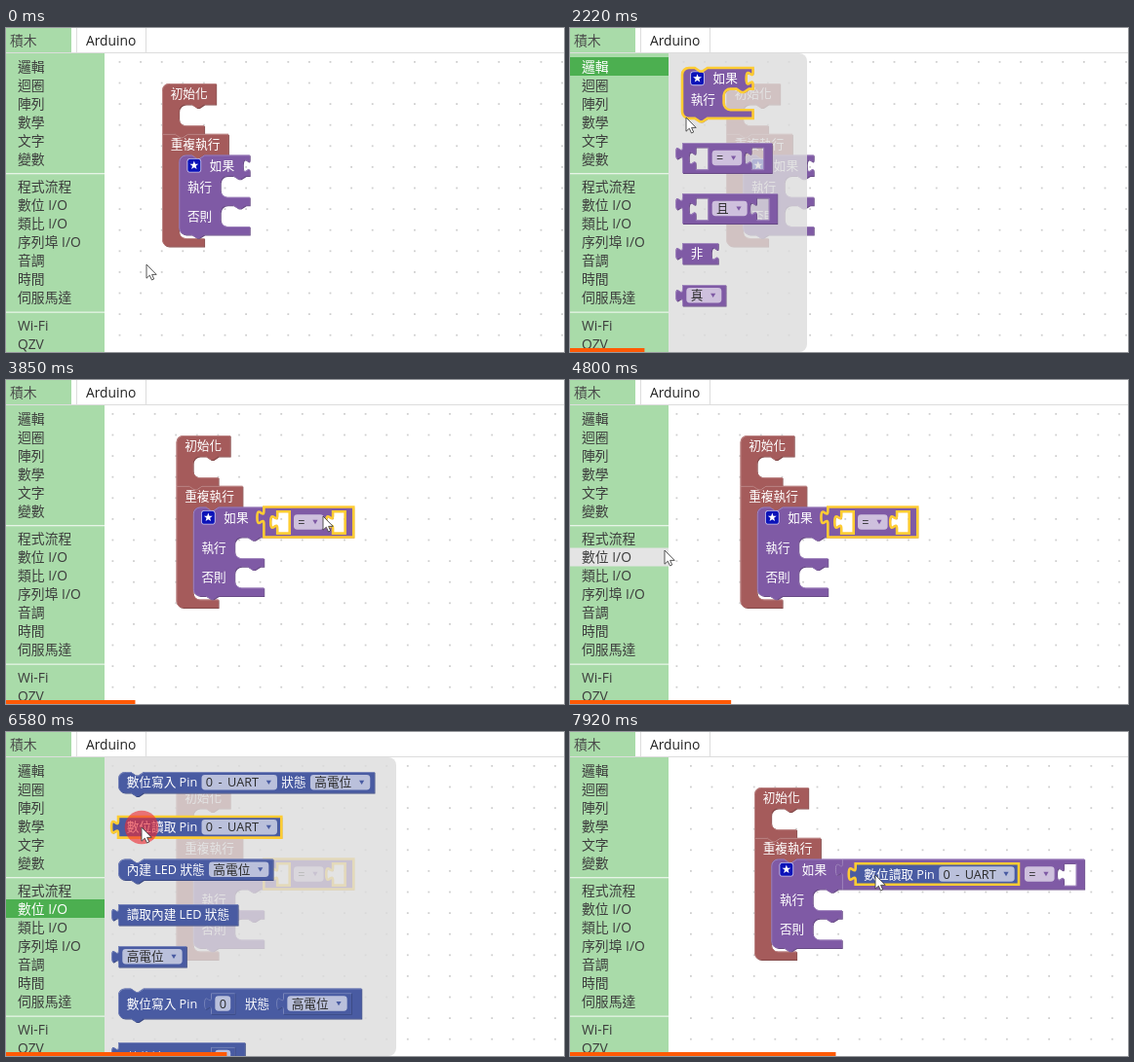
Animation of 572 by 333 pixels, one loop 8000 ms. Source, as an HTML page with a canvas:

```html
<!DOCTYPE html>
<html lang="zh-Hant">
<head>
<meta charset="utf-8">
<title>積木</title>
<style>
  html, body { margin: 0; width: 100%; height: 100%; overflow: hidden; background: #fff; }
  canvas { display: block; width: 572px; height: 333px; }
</style>
</head>
<body>
<canvas id="stage"></canvas>
<script>
const W = 572, H = 333, LOOP = 8000, SCALE = 0.864;
const FONT = '"Open Sans", "Noto Sans CJK TC", "Noto Sans CJK", sans-serif';
const RED = '#a55b5b', PURPLE = '#7f5aa5', BLUE = '#495ba2', YELLOW = '#fc3';
const canvas = document.getElementById('stage');
const ctx = canvas.getContext('2d');
const ratio = window.devicePixelRatio || 1;
canvas.width = W * ratio;
canvas.height = H * ratio;

// Outline pieces, in block units
const NOTCH = 'l6 4 3 0 6-4';
const NOTCH_BACK = 'l-6 4-3 0-6-4';
const TAB = 'v5c0 10-8-8-8 7.5s8-2.5 8 7.5';
const TAB_UP = 'V20c0-10-8 8-8-7.5s8 2.5 8-7.5';
const TEXT_SIZE = 14.67, ROW = 25, TALL_ROW = 36;
const ARROW_SPACE = 17, MENU_WORD_SPACING = '2.5px';

function textWidth(text, wordSpacing = '0px') {
  ctx.font = `${TEXT_SIZE}px ${FONT}`;
  ctx.wordSpacing = wordSpacing;
  const { width } = ctx.measureText(text);
  ctx.wordSpacing = '0px';
  return width;
}

function mix(hex, other, amount) {
  const value = i => parseInt(hex.substr(1 + 2 * i, 2), 16);
  return `rgb(${[0, 1, 2].map(i => Math.round(value(i) * (1 - amount) + other * amount))})`;
}

function finish(color, path, w, h, parts) {
  return { color, w, h, parts, path: new Path2D(path), light: mix(color, 255, 0.3), dark: mix(color, 0, 0.2) };
}

const menu = text => ({ kind: 'menu', text });
const field = text => ({ kind: 'field', text });
const slot = child => ({ kind: 'slot', child });

// One-row block; shape is 'output' or 'statement'
function rowBlock(color, shape, items, openEnd = false) {
  const tall = items.some(item => item.kind === 'slot');
  const h = tall ? TALL_ROW : ROW, top = (h - ROW) / 2;
  const parts = [];
  let x = 10, holes = '';
  for (const item of items) {
    let w;
    if (item.kind === 'slot') {
      w = item.child ? item.child.w + 8 : 20.5;
      if (item.child) parts.push({ kind: 'block', block: item.child, x: x + 6, y: top });
      else holes += `M${x + w} ${top}H${x + 6}${TAB}v6H${x + w}z`;
    } else {
      const part = typeof item === 'string' ? { kind: 'label', text: item } : item;
      w = part.kind === 'menu' ? textWidth(part.text, MENU_WORD_SPACING) + ARROW_SPACE : textWidth(part.text);
      parts.push({ ...part, x, y: top + 12.5, w });
    }
    x += w + 10;
  }
  const w = x + (openEnd ? 8 : 0);
  const edge = `H${w}${openEnd ? TAB : ''}V${h}`;
  const outline = shape === 'output'
    ? `M0 0${edge}H0${TAB_UP}z`
    : `M0 8A8 8 0 0 1 8 0H15${NOTCH}${edge}H30${NOTCH_BACK}H8a8 8 0 0 1-8-8z`;
  return finish(color, outline + holes, w, h, parts);
}

// Block with one or more statement mouths
function mouthBlock(color, o) {
  const mouths = o.mouths.map(h =>
    `H${o.edge + 30}${NOTCH_BACK}h-7a8 8 0 0 0-8 8v${h - 16}a8 8 0 0 0 8 8H${o.arm}v10`).join('');
  const path = (o.squareTop ? 'M0 0' : 'M0 8A8 8 0 0 1 8 0') + (o.prev ? 'H15' + NOTCH : '')
    + `H${o.w}${o.socket ? TAB : ''}V${o.head}${mouths}` + (o.next ? 'H30' + NOTCH_BACK : '')
    + (o.squareBottom ? 'H0z' : 'H8a8 8 0 0 1-8-8z');
  const h = o.mouths.reduce((sum, m) => sum + m + 10, o.head);
  return finish(color, path, o.w, h, o.parts);
}

const label = (text, x, y) => ({ kind: 'label', text, x, y });

function ifBlock(head, mouthLabels) {
  return mouthBlock(PURPLE, {
    edge: 49.3, w: 84, arm: 84, head, mouths: mouthLabels.map(() => 25),
    prev: true, next: true, socket: true,
    parts: [{ kind: 'star', x: 10, y: 12.5 }, label('如果', 36.5, 12.5),
      ...mouthLabels.map((text, i) => label(text, 10, head + 12.5 + 35 * i))]
  });
}

const loopBlock = inner => mouthBlock(RED, {
  edge: 20, w: 78.7, arm: 50, head: ROW, mouths: [inner + 4], squareTop: true, prev: true,
  parts: [label('重複執行', 10, 12.5)]
});

const setup = mouthBlock(RED, {
  edge: 20, w: 64, arm: 50, head: ROW, mouths: [25], next: true, squareBottom: true,
  parts: [label('初始化', 10, 12.5)]
});
const program = [ROW, TALL_ROW].map(head => {
  const branch = ifBlock(head, ['執行', '否則']);
  return { branch, loop: loopBlock(branch.h) };
});

const equals = rowBlock(PURPLE, 'output', [slot(), menu('='), slot()]);
const readPin = rowBlock(BLUE, 'output', ['數位讀取 Pin', menu('0 - UART')]);
const equalsRead = rowBlock(PURPLE, 'output', [slot(readPin), menu('='), slot()]);
const zero = rowBlock(BLUE, 'output', [field('0')]);
const level = rowBlock(BLUE, 'output', [menu('高電位')]);

const flyouts = [
  { from: 1640, to: 2600, right: 243, row: 0, blocks: [
    [41, ifBlock(ROW, ['執行'])],
    [118, equals],
    [170, rowBlock(PURPLE, 'output', [slot(), menu('且'), slot()])],
    [221, rowBlock(PURPLE, 'output', ['非'], true)],
    [264, rowBlock(PURPLE, 'output', [menu('真')])]
  ] },
  { from: 5250, to: 6620, right: 400, row: 7, blocks: [
    [41, rowBlock(BLUE, 'statement', ['數位寫入 Pin', menu('0 - UART'), '狀態', menu('高電位')])],
    [87, readPin],
    [130.5, rowBlock(BLUE, 'statement', ['內建 LED 狀態', menu('高電位')])],
    [177, rowBlock(BLUE, 'output', ['讀取內建 LED 狀態'])],
    [220, level],
    [263.5, rowBlock(BLUE, 'statement', ['數位寫入 Pin', slot(zero), '狀態', slot(level)])],
    [319, rowBlock(BLUE, 'output', ['數位讀取 Pin', slot(zero)])]
  ] }
];

const drags = [
  { from: 2600, to: 3780, block: equals, grab: [59, 6] },
  { from: 6620, to: 7380, block: readPin, grab: [24, 11] }
];
const presses = [[1600, 1800], [2500, 3780], [5160, 5330], [6480, 7380]];

// time, x, y of the pointer tip
const pointerPath = [
  [0, 144, 243], [70, 144, 243], [830, 75, 90], [1500, 62, 31], [1800, 62, 31],
  [2220, 119, 92], [2480, 174, 124], [2600, 174, 124], [3240, 277, 166], [3340, 277, 166],
  [3700, 325, 140], [4340, 325, 140], [4800, 97, 175], [5100, 86, 179], [5350, 86, 179],
  [5830, 89.5, 167], [5950, 89.5, 167], [6430, 139, 98], [6600, 139, 98], [6820, 180, 150],
  [6990, 277, 179], [7050, 281, 166], [7340, 313, 147], [LOOP, 313, 147]
];

const categories = [
  ['邏輯', 40], ['迴圈', 59], ['陣列', 78], ['數學', 97], ['文字', 116], ['變數', 135],
  ['程式流程', 163], ['數位 I/O', 182], ['類比 I/O', 201], ['序列埠 I/O', 220],
  ['音調', 239], ['時間', 258], ['伺服馬達', 277], ['Wi-Fi', 306], ['QZV', 325]
];

const during = (t, span) => t >= span.from && t < span.to;

function pointerAt(t) {
  const i = Math.max(1, pointerPath.findIndex(key => key[0] >= t));
  const [t0, x0, y0] = pointerPath[i - 1], [t1, x1, y1] = pointerPath[i];
  const p = (t - t0) / (t1 - t0), e = p * p * (3 - 2 * p);
  return [x0 + (x1 - x0) * e, y0 + (y1 - y0) * e];
}

function write(text, x, middle, size, color) {
  ctx.font = `${size}px ${FONT}`;
  ctx.fillStyle = color;
  ctx.fillText(text, x, middle + size * 0.37);
}

function box(x, y, w, h, color) {
  ctx.fillStyle = color;
  ctx.fillRect(x, y, w, h);
}

function roundBox(x, y, w, h, r, color) {
  ctx.beginPath();
  ctx.roundRect(x, y, w, h, r);
  ctx.fillStyle = color;
  ctx.fill();
}

function drawPart(part, color, selected) {
  const { kind, text, x, y, w } = part;
  if (kind === 'block') {
    drawBlockUnits(part.block, x, y, selected);
  } else if (kind === 'star') {
    roundBox(x - 0.5, y - 8.5, 17, 17, 4, '#c9c4ee');
    roundBox(x + 0.5, y - 7.5, 15, 15, 3, '#0b12b8');
    ctx.beginPath();
    for (let i = 0; i < 10; i++) {
      const a = -Math.PI / 2 + i * Math.PI / 5, r = i % 2 ? 2.2 : 5.4;
      ctx.lineTo(x + 8 + r * Math.cos(a), y + r * Math.sin(a));
    }
    ctx.fillStyle = '#fff';
    ctx.fill();
  } else if (kind === 'label') {
    write(text, x, y, TEXT_SIZE, '#fff');
  } else {
    roundBox(x - 5, y - 9, w + 10, 18, 4, 'rgba(255,255,255,.62)');
    if (kind === 'menu') {
      const ax = x + w - 5;
      ctx.fillStyle = color;
      ctx.fill(new Path2D(`M${ax - 3} ${y - 2.5}h6l-3 5z`));
      ctx.wordSpacing = MENU_WORD_SPACING;
    }
    write(text, x, y, TEXT_SIZE, '#2a2a2a');
    ctx.wordSpacing = '0px';
  }
}

function drawBlockUnits(block, x, y, selected) {
  ctx.save();
  ctx.translate(x, y);
  if (ctx.globalAlpha === 1) {
    ctx.save();
    ctx.translate(1, 1);
    ctx.fillStyle = block.dark;
    ctx.fill(block.path, 'evenodd');
    ctx.restore();
  }
  ctx.fillStyle = block.color;
  ctx.fill(block.path, 'evenodd');
  if (block !== selected) {
    ctx.save();
    ctx.clip(block.path, 'evenodd');
    ctx.translate(0.5, 0.5);
    ctx.strokeStyle = block.light;
    ctx.lineWidth = 1.1;
    ctx.stroke(block.path);
    ctx.restore();
  }
  for (const part of block.parts) drawPart(part, block.color, selected);
  if (block === selected) {
    ctx.strokeStyle = YELLOW;
    ctx.lineWidth = 3;
    ctx.stroke(block.path);
  }
  ctx.restore();
}

function drawBlock(block, x, y, selected) {
  ctx.save();
  ctx.translate(x, y);
  ctx.scale(SCALE, SCALE);
  drawBlockUnits(block, 0, 0, selected);
  ctx.restore();
}

function drawWorkspace(t) {
  const shift = t < 2600 ? 0 : t < 6620 ? 14.5 : 29;
  const grid = 25 * SCALE;
  for (let y = 34; y < H; y += grid) {
    for (let x = 94 + shift; x < W; x += grid) box(x, y, 1.8, 1.8, '#cfcfcf');
  }
  const joined = t >= drags[0].to, filled = t >= drags[1].to;
  const { branch, loop } = program[joined ? 1 : 0];
  const x = 160 + shift, y = 57;
  const branchX = x + 20 * SCALE, branchY = y + 85 * SCALE;
  drawBlock(setup, x, y);
  drawBlock(loop, x, y + 60 * SCALE);
  drawBlock(branch, branchX, branchY);
  if (joined) {
    const selected = filled ? readPin : t < drags[1].from ? equals : null;
    drawBlock(filled ? equalsRead : equals, branchX + 84 * SCALE, branchY, selected);
  }
}

function drawFlyout(flyout, [px, py]) {
  ctx.save();
  ctx.beginPath();
  ctx.rect(0, 26, W, H);
  ctx.clip();
  roundBox(101, 26, flyout.right - 101, H - 26, [0, 8, 8, 0], 'rgba(221,221,221,.8)');
  for (const [y, block] of flyout.blocks) {
    const hit = px > 109 && px < 115 + block.w * SCALE && py > y && py < y + block.h * SCALE;
    drawBlock(block, 115, y, hit ? block : null);
  }
  ctx.restore();
}

function drawSidebar(selectedRow, pointer) {
  const green = '#a9dba9';
  box(0, 26, 101, H - 26, green);
  categories.forEach(([text, y], i) => {
    const hover = pointer && pointer[0] < 101 && Math.abs(pointer[1] - y) < 9.5;
    if (i === selectedRow) box(0, y - 10, 101, 19, '#4caf50');
    else if (hover) box(0, y - 9.5, 101, 19, '#e4e4e4');
    write(text, 12, y, 13.83, i === selectedRow ? '#fff' : '#3c3c3c');
  });
  box(0, 149, 101, 1.3, '#e6f4e6');
  box(0, 291.5, 101, 1.3, '#e6f4e6');
  box(0, 0, W, 26, '#fff');
  box(0, 25, W, 1, '#ddd');
  box(0, 0, 67, 25, green);
  box(72, 0, 1, 26, '#ddd');
  box(143, 0, 1, 26, '#ddd');
  write('積木', 4, 12.5, 13.83, '#4a4a4a');
  write('Arduino', 82, 12.5, 13.83, '#222');
}

const arrow = new Path2D('M0 0V14.2L3.3 11.2 5.5 16 7.7 15 5.6 10.4H10.2Z');

function drawPointer(t, [x, y]) {
  if (presses.some(([from, to]) => t >= from && t < to)) {
    ctx.beginPath();
    ctx.arc(x, y, 17.3, 0, 2 * Math.PI);
    ctx.fillStyle = 'rgba(238,45,50,.62)';
    ctx.fill();
  }
  ctx.save();
  ctx.translate(x, y);
  ctx.fillStyle = '#fff';
  ctx.fill(arrow);
  ctx.strokeStyle = '#444';
  ctx.lineWidth = 0.9;
  ctx.stroke(arrow);
  ctx.restore();
}

function draw(t) {
  const pointer = pointerAt(t);
  const flyout = flyouts.find(f => during(t, f));
  const drag = drags.find(d => during(t, d));
  ctx.setTransform(ratio, 0, 0, ratio, 0, 0);
  box(0, 0, W, H, '#fff');
  drawWorkspace(t);
  if (flyout) drawFlyout(flyout, pointer);
  drawSidebar(flyout ? flyout.row : -1, drag ? null : pointer);
  if (drag) {
    const [x, y] = pointerAt(t - 60); // the block trails the pointer a little
    ctx.globalAlpha = 0.8;
    drawBlock(drag.block, x - drag.grab[0], y - drag.grab[1], drag.block);
    ctx.globalAlpha = 1;
  }
  drawPointer(t, pointer);
  box(0, 329, t * 0.0344, 4, '#ff5a05');
}

const start = performance.now();
function tick() {
  draw((performance.now() - start) % LOOP);
  requestAnimationFrame(tick);
}
tick();
</script>
</body>
</html>
```
